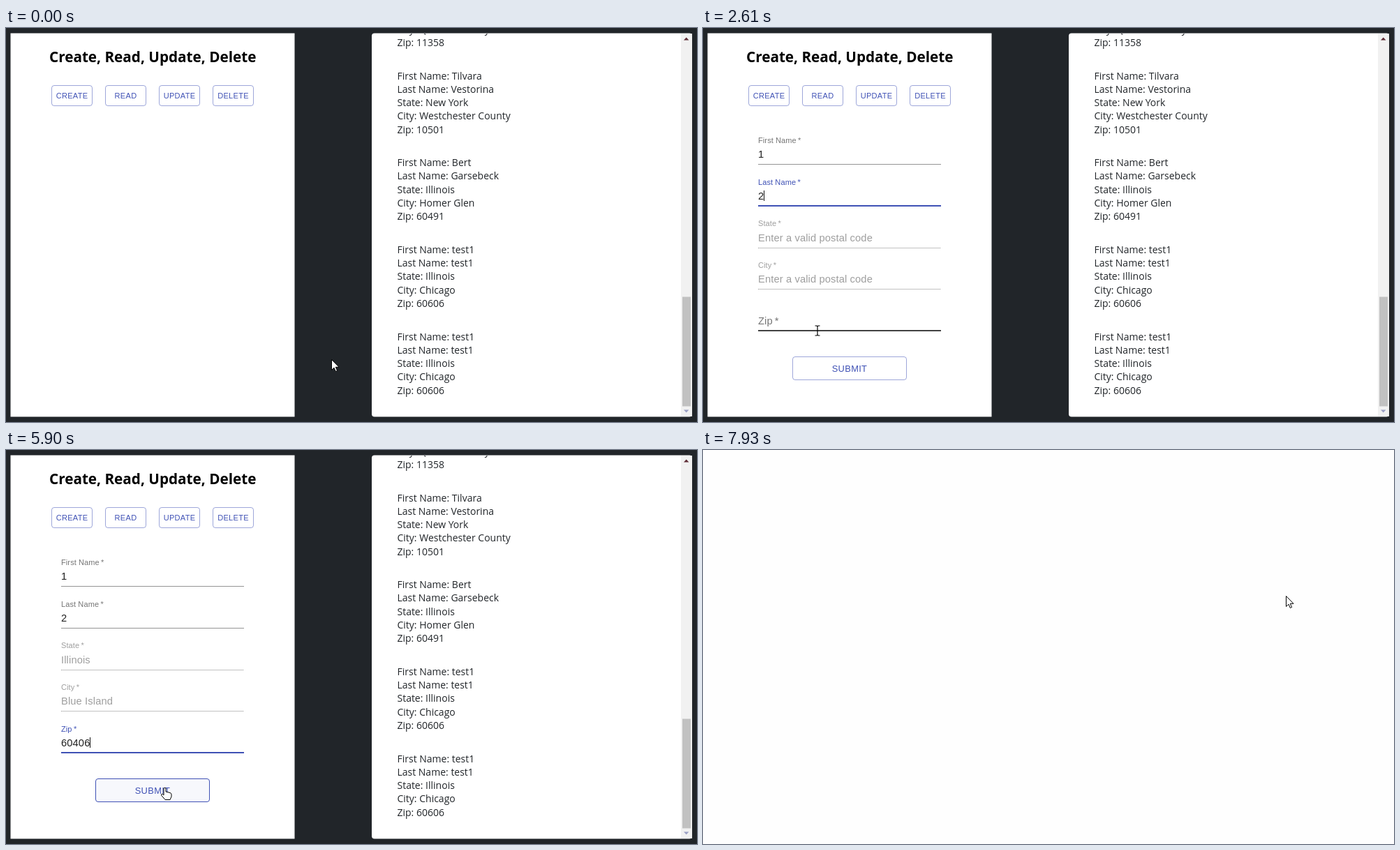
Recreate the animation shown at these times as an HTML page. Size 990 by 565 pixels, loop 8 s.

```html
<!DOCTYPE html>
<html lang="en">
<head>
<meta charset="utf-8">
<title>Create, Read, Update, Delete</title>
<style>
  html, body { margin: 0; width: 100%; height: 100%; overflow: hidden; background: #212529; }
  svg { display: block; width: 990px; height: 565px; }
  text { white-space: pre; }
  .title { font: 700 20.7px "Open Sans", sans-serif; }
  .record { font: 14px "Open Sans", sans-serif; fill: #212529; }
  .button { font: 11px "Liberation Sans", Arial, sans-serif; letter-spacing: .02857em; text-anchor: middle; fill: #3f51b5; }
  .button.large { font-size: 12.83px; }
  .field { font: 14.67px "Liberation Sans", Arial, sans-serif; letter-spacing: .00938em; }
</style>
</head>
<body>
<svg viewBox="0 0 990 565">
  <defs><clipPath id="view"><rect x="524" y="8" width="443" height="549"/></clipPath></defs>
  <rect width="990" height="565" fill="#212529"/>
  <rect x="6.5" y="7.5" width="407" height="550" fill="#fff"/>
  <text class="title" x="62" y="48.5">Create, Read, Update, Delete</text>
  <rect x="524" y="7.5" width="459" height="550" rx="4" fill="#fff"/>
  <g id="records" clip-path="url(#view)"></g>
  <path d="M967 8h16v549h-16z" fill="#f1f1f1"/>
  <path d="M969 385.500h12v157h-12z" fill="#c1c1c1"/>
  <path d="M971 17.500l3.700-4 3.700 4z" fill="#5c2a33"/>
  <path d="M971 547.500l3.700 4 3.700-4z" fill="#9a9fc4"/>
  <g id="live"></g>
</svg>
<script>
const LOOP = 8000, BLUE = '#3f51b5', LEFT = 79, WIDTH = 262;
const live = document.getElementById('live');

const text = (cls, x, y, str, extra = '') => `<text class="${cls}" x="${x}" y="${y}" ${extra}>${str}</text>`;
const rect = (x, y, w, h, fill) => `<rect x="${x}" y="${y}" width="${w}" height="${h}" fill="${fill}"/>`;

const people = [
  ['', '', '', 'Queens County', '11358'],
  ['Tilvara', 'Vestorina', 'New York', 'Westchester County', '10501'],
  ['Bert', 'Garsebeck', 'Illinois', 'Homer Glen', '60491'],
  ['test1', 'test1', 'Illinois', 'Chicago', '60606'],
  ['test1', 'test1', 'Illinois', 'Chicago', '60606']
];
const names = ['First Name', 'Last Name', 'State', 'City', 'Zip'];
document.getElementById('records').innerHTML = people.map((person, p) =>
  person.map((value, i) => text('record', 560.5, 73.5 + (p - 1) * 124.7 + i * 19.25, `${names[i]}: ${value}`)).join('')
).join('');

const pointers = {
  arrow: '<path d="M.5.5V15.500L4 12.200 6.300 17.500 8.600 16.500 6.300 11.300H11Z" fill="#fff" stroke="#000" stroke-linejoin="round"/>',
  beam: '<path d="M-3.500-7H-1L0-6 1-7H3.500M0-6V6M-3.500 7H-1L0 6 1 7H3.500" fill="none" stroke="#000" stroke-width="1.200"/>',
  hand: '<path d="M-1 1Q.5-.5 2 1V6L8 7.500Q10 8 10 10V13L8 17.500H1L-4.500 11Q-4.500 8.500-2.500 9.500L-1 11Z" fill="#fff" stroke="#000"/>'
};

// Each step changes only the listed parts of the state.
const at = (pointer, x, y) => ({ pointer, x, y });
const steps = [
  [0, { ...at('arrow', 466, 475), form: false, focus: -1, hover: -1, grow: 0, caret: false,
        first: '', last: '', zip: '', over: '', press: 0, blank: false }],
  [20, at('arrow', 446, 448)],
  [130, at('arrow', 352, 330)],
  [240, at('arrow', 220, 190)],
  [340, at('arrow', 134, 118)],
  [450, { ...at('hand', 105, 99), over: 'CREATE' }],
  [560, { ...at('hand', 100, 96), press: .08 }],
  [660, { press: .2 }],
  [770, { form: true, press: .1 }],
  [880, { ...at('arrow', 112, 122), over: '', press: 0 }],
  [1000, { ...at('beam', 128, 178), hover: 0 }],
  [1120, { ...at('beam', 136, 191), hover: -1, focus: 0, grow: .6 }],
  [1250, { grow: 1, caret: true }],
  [1500, { first: '1' }],
  [1610, at('beam', 138, 217)],
  [1740, { ...at('beam', 143, 240), hover: 1 }],
  [1980, { hover: -1, focus: 1, grow: .5, caret: false }],
  [2110, { grow: 1, caret: true }],
  [2230, at('beam', 148, 276)],
  [2350, at('arrow', 156, 358)],
  [2460, { ...at('beam', 164, 434), hover: 4 }],
  [2610, { last: '2' }],
  [2740, at('beam', 150, 430)],
  [2850, { ...at('beam', 144, 428), hover: -1, focus: 4, grow: .6, caret: false }],
  [2970, { grow: 1, caret: true }],
  [3370, { caret: false }],
  [3490, { zip: '6', caret: true }],
  [3750, { zip: '604' }],
  [4010, { zip: '6040' }],
  [4530, { caret: false }],
  [4780, { zip: '60406', caret: true }],
  [5320, { caret: false }],
  [5620, at('arrow', 224, 477)],
  [5770, { ...at('hand', 226, 482), over: 'SUBMIT', caret: true }],
  [5900, at('hand', 227, 484)],
  [6150, { focus: -1, caret: false, press: .1 }],
  [6270, { press: .2 }],
  [6390, { press: .12 }],
  [6510, { press: .05 }],
  [6650, { pointer: '', over: '', press: 0 }],
  [7780, { ...at('arrow', 828, 197), blank: true }],
  [7930, at('arrow', 835, 209)]
];
let state = {};
const timeline = steps.map(([time, change]) => [time, state = { ...state, ...change }]);

function button(s, label, x, y, w, h, large) {
  const over = s.over === label;
  const fill = over ? .04 + s.press : 0;
  return `<rect x="${x}" y="${y}" width="${w}" height="${h}" rx="3.500" fill="${BLUE}" fill-opacity="${fill}"
    stroke="${BLUE}" stroke-opacity="${over ? 1 : .5}"/>` +
    text(large ? 'button large' : 'button', x + w / 2, y + (large ? 21.3 : 18), label);
}

function field(s, i, value, disabled) {
  const base = 186.3 + i * 59.7, line = Math.round(base + 9);
  const focused = s.focus === i;
  const lift = value ? 1 : focused ? s.grow : 0;
  const color = focused ? BLUE : disabled ? '#9e9e9e' : '#757575';
  let out = text('field', LEFT, base - 21.3 * lift, names[i] + '&thinsp;*',
    `fill="${color}" style="font-size:${14.67 - 3.67 * lift}px"`);
  out += text('field', LEFT, base, value, `fill="${disabled ? '#9e9e9e' : '#212121'}"`);
  if (disabled) {
    out += `<path d="M${LEFT} ${line + .5}h${WIDTH}" stroke="#858585" stroke-dasharray="1"/>`;
  } else {
    out += s.hover === i ? rect(LEFT, line - 1, WIDTH, 2, '#424242') : rect(LEFT, line, WIDTH, 1, '#949494');
  }
  if (focused) {
    out += rect(LEFT + WIDTH * (1 - s.grow) / 2, line - 1, WIDTH * s.grow, 2, BLUE);
    if (s.caret) out += rect(Math.floor(LEFT + 8.3 * value.length), Math.round(base - 13), 1, 15, '#111');
  }
  return out;
}

function form(s) {
  const found = s.zip.length === 5, hint = 'Enter a valid postal code';
  const values = [s.first, s.last, found ? 'Illinois' : hint, found ? 'Blue Island' : hint, s.zip];
  return values.map((value, i) => field(s, i, value, i === 2 || i === 3)).join('') +
    button(s, 'SUBMIT', 128.5, 471.5, 163, 33, true);
}

function scene(s) {
  const pointer = s.pointer ? `<g transform="translate(${s.x} ${s.y})">${pointers[s.pointer]}</g>` : '';
  if (s.blank) return rect(0, 0, 990, 565, '#fefefe') + pointer;
  const menu = ['CREATE', 'READ', 'UPDATE', 'DELETE'].map((label, i) => button(s, label, 65.5 + i * 77, 82.5, 58, 29));
  return menu.join('') + (s.form ? form(s) : '') + pointer;
}

let shown;
function frame() {
  const time = performance.now() % LOOP;
  const current = timeline.findLast(([start]) => start <= time)[1];
  if (current !== shown) live.innerHTML = scene(shown = current);
  requestAnimationFrame(frame);
}
frame();
</script>
</body>
</html>
```
